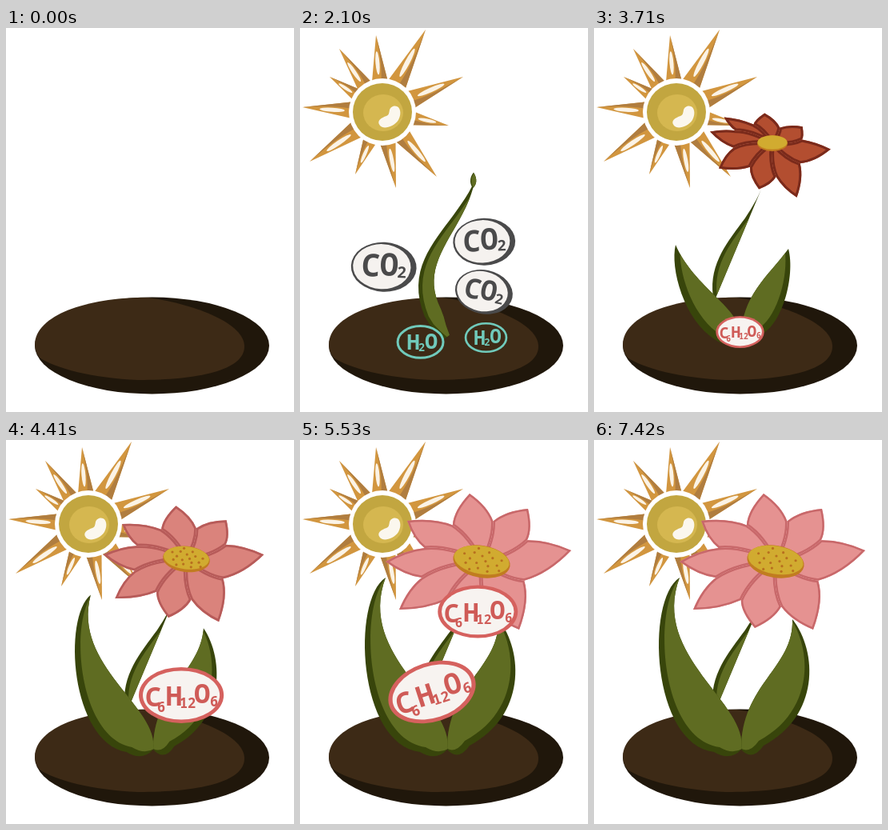
These frames come from a looping animation (360x480 px, 8680 ms). An HTML page with a canvas:

```html
<!DOCTYPE html>
<html lang="en">
<head>
<meta charset="utf-8">
<title>Photosynthesis</title>
<style>
html, body { margin: 0; width: 100%; height: 100%; overflow: hidden; background: #fff; }
canvas { display: block; }
</style>
</head>
<body>
<canvas id="stage" width="360" height="480"></canvas>
<script>
const ctx = document.getElementById('stage').getContext('2d');
const LOOP = 8680, BEAT = 70;
// Length of each pose in beats.
const POSES = [7, 7, 6, 5, 5, 5, 5, 4, 3, 6, 6, ...Array(8).fill(4), ...Array(5).fill(3), 18];
const FONT = '"Noto Sans Mono", "DejaVu Sans Mono", monospace';

const clamp = v => Math.max(0, Math.min(1, v));
const mix = (a, b, k) => a.map((v, i) => v + (b[i] - v) * k);
const rgb = c => `rgb(${c.map(Math.round)})`;

// Bezier curve through any number of control points.
function bezier(points, t) {
  while (points.length > 1) points = points.slice(1).map((p, i) => mix(points[i], p, t));
  return points[0];
}

function at(x, y, scale, degrees, draw) {
  ctx.save();
  ctx.translate(x, y);
  ctx.rotate(degrees * Math.PI / 180);
  ctx.scale(scale, scale);
  draw();
  ctx.restore();
}

function fill(path, color) {
  ctx.fillStyle = color;
  ctx.fill(path instanceof Path2D ? path : new Path2D(path));
}

function ellipse(x, y, rx, ry, angle = 0) {
  const p = new Path2D();
  p.ellipse(x, y, rx, ry, angle, 0, Math.PI * 2);
  return p;
}

// Dark green shape with its light copy shifted inside it.
function shade(d, dx, dy) {
  const p = new Path2D(d);
  ctx.save();
  fill(p, '#38450b');
  ctx.clip(p);
  ctx.translate(dx, dy);
  fill(p, '#5f6c22');
  ctx.restore();
}

function soil() {
  fill(ellipse(182.5, 397, 146.5, 60.5), '#20170b');
  fill('M36 396C36 358 105 336 178 337C240 346 298 370 298 398C298 428 240 440 165 440' +
    'C110 438 60 425 42 412Q36 404 36 396Z', '#3d2a16');
}

const RAYS = [[54, -103], [101, -44], [83, 17], [68, 81], [17, 95], [-34, 78],
  [-91, 62], [-100, -6], [-66, -44], [-54, -79], [-8, -96]];

function sun(n) {
  const moved = 2 * clamp((n - 2) / 2);
  ctx.globalAlpha = clamp(.45 + .15 * n);
  at(78 + 12.5 * moved, 86 + 9.5 * moved, Math.min(1, .29 + .178 * n), 0, () => {
    for (const [x, y] of RAYS) {
      const len = Math.hypot(x, y), w = len * .11 - 1, mid = 40 + (len - 40) * .38;
      at(0, 0, 1, Math.atan2(y, x) * 180 / Math.PI, () => {
        fill(`M40 ${-w}L${len} 0L40 ${w}Z`, '#d2963f');
        fill(`M40 ${w * .2}Q${mid} ${w * .5} ${len} 0L40 ${w}Z`, '#b07d3f');
        fill(ellipse(mid, -w * .1, (len - 40) * .26, w * .26), '#fbf3e6');
      });
    }
    fill(ellipse(0, 0, 42, 42), '#fff');
    fill(ellipse(0, 0, 37, 36), '#c2a640');
    fill(ellipse(1, 1, 25, 23), '#d5b750');
    fill('M13 -7C22 -10 25 1 20 10C14 19 1 22 -3 17C-8 11 -1 7 5 5C11 3 6 -4 13 -7Z', '#fbf7ee');
  });
  ctx.globalAlpha = 1;
}

// The stem grows along its spine and tapers towards the tip.
function stem(n) {
  const grown = Math.min(1, .17 + .277 * (n - 2));
  const spine = [[184, 386], [160 - 40 * grown, 300], [190, 265], [216, 198]];
  const start = n < 9 ? 0 : .2, least = n < 8 ? 1 : 5, left = [], right = [];
  for (let i = 0; i <= 24; i++) {
    const u = start + (grown - start) * i / 24, v = u / grown;
    const [x, y] = bezier(spine, u), [x2, y2] = bezier(spine, u + .01);
    const half = Math.max(least, 12 * Math.sqrt(grown) * (1 - v) ** .6) * Math.min(1, .3 + 7 * v);
    const k = half / Math.hypot(x2 - x, y2 - y);
    left.push([x + (y2 - y) * k, y - (x2 - x) * k]);
    right.unshift([x - (y2 - y) * k, y + (x2 - x) * k]);
  }
  shade('M' + [...left, ...right].map(p => p.join(' ')).join('L') + 'Z', 5 * Math.sqrt(grown), 0);
}

function bud(n) {
  at(216, 200, .25 + .75 * (n - 5), 0, () => shade('M4 -78C-20 -48 -14 -18 0 0C18 -14 26 -43 4 -78Z', 5, 0));
}

// Leaves, young and grown: tip, two outer controls, heel, two inner controls.
const LEFT = [[102, 271, 95, 300, 112, 365, 152, 390, 185, 350, 125, 325],
  [107, 172, 64, 200, 72, 380, 150, 390, 195, 330, 70, 270]];
const RIGHT = [[243, 276, 252, 310, 235, 375, 205, 385, 184, 335, 218, 310],
  [248, 224, 280, 265, 282, 345, 212, 382, 184, 305, 250, 285]];

function leaf([young, grown], k, dx) {
  const p = mix(young, grown, k);
  const tip = p.slice(0, 2), heel = p[6] < 184 ? 170 : 198;
  shade(`M${tip}C${p.slice(2, 8)}Q${heel} 402 184 387C${p.slice(8)} ${tip}Z`, dx, -6);
}

function leaves(size, k) {
  at(183, 388, size, 0, () => {
    ctx.translate(-183, -388);
    leaf(RIGHT, k, -6);
    leaf(LEFT, k, 7);
  });
}

// Petal tips of the open flower, clockwise from the top.
const TIPS = [[-15, -85], [58, -66], [112, -14], [47, 85], [-26, 83], [-103, 60], [-120, 0], [-93, -51]];

// Half a petal: from the notch between two petals, bulging, to the tip.
function bulge([nx, ny], [x, y]) {
  const along = (nx * x + ny * y) / (x * x + y * y);
  return [(nx + x) / 2 + (nx - along * x) * .35, (ny + y) / 2 + (ny - along * y) * .35];
}

// Control point that bends the seam between two petals.
const seam = ([x, y]) => [x * .58 - y * .14, y * .58 + x * .14];

function flower(size, open) {
  const cx = 223 + 4 * open, cy = 144 + 8 * open + 18 * (1 - size);
  const tone = Math.sqrt(open), tilt = .17 * open;
  const rx = 19 + 17 * open, ry = 10 + 10 * open;
  const tips = TIPS.map(([x, y]) => {
    const closed = y < 0 ? .42 : .73;
    return [x * (.65 + .35 * open), y * (closed + (1 - closed) * open) + x * .12 * (1 - open)];
  });
  const notches = tips.map((tip, i) => mix(tip, tips[(i + 1) % 8], .5).map(v => v * .67));
  at(cx, cy, size, 0, () => {
    ctx.lineJoin = 'round';
    ctx.lineWidth = 6 - open;
    ctx.strokeStyle = rgb(mix([122, 42, 27], [200, 104, 106], tone));
    tips.forEach((tip, i) => {
      const a = notches[(i + 7) % 8], b = notches[i];
      const petal = new Path2D(`M0 0Q${seam(a)} ${a}Q${bulge(a, tip)} ${tip}Q${bulge(b, tip)} ${b}Q${seam(b)} 0 0Z`);
      ctx.save();
      fill(petal, rgb(mix([179, 78, 48], [229, 146, 145], tone)));
      ctx.clip(petal);
      ctx.stroke(petal);
      ctx.restore();
    });
    fill(ellipse(0, 0, rx, ry, tilt), '#c17c20');
    fill(ellipse(0, -ry * .1, rx * .97, ry * .88, tilt), '#d1ab30');
    if (open < .5) return;
    for (let i = 0; i < 17; i++) {
      const a = i * 2.4, r = Math.sqrt((i + .5) / 17) * .8;
      fill(ellipse(Math.cos(a) * r * rx, Math.sin(a) * r * ry + Math.cos(a) * r * 4 - 1, 1.6, 1.6), '#b8701f');
    }
  });
}

// Letters at x and baseline; digits are set at half size.
function formula(color, size, ...letters) {
  ctx.fillStyle = color;
  ctx.textAlign = 'center';
  for (const [char, x, y] of letters) {
    ctx.font = `600 ${/\d/.test(char) ? size / 2 : size}px ${FONT}`;
    ctx.fillText(char, x, y);
  }
}

function carbon() {
  fill(ellipse(0, 0, 43, 32.5), '#4a4a4b');
  fill(ellipse(-2.5, -.5, 38, 29.5), '#f5f2ef');
  formula('#4a4a4b', 41, ['C', -17, 13], ['O', 7, 11], ['2', 24, 13]);
}

function water() {
  ctx.lineWidth = 4;
  ctx.strokeStyle = '#70cabb';
  ctx.stroke(ellipse(0, 0, 38, 26.5));
  formula('#70cabb', 36, ['H', -12, 13], ['2', 2, 15], ['O', 18, 11]);
}

function glucose() {
  fill(ellipse(0, 0, 53, 35), '#d5615e');
  fill(ellipse(0, 0, 48, 30.5), '#f7f3f0');
  formula('#cf5b57', 34, ['C', -35, 14], ['6', -25, 21], ['H', -9, 13], ['12', 8, 16], ['O', 26, 10], ['6', 41, 14]);
}

// Labels: first and last pose, then a curve of x, y, size and angle.
const GLIDES = [
  [carbon, 1, 8, [58, 200, .97, 0], [72, 285, 1.18, 0], [180, 375, .6, 8]],
  [carbon, 1, 7, [297, 289, 1, 10], [268, 310, 1.05, 10], [175, 360, .6, 14]],
  [carbon, 4, 7, [250, 248, .9, 0], [218, 272, 1, -4], [200, 325, .55, 0]],
  [water, 1, 7, [107, 392, 1.02, 0], [140, 392, .98, 0], [172, 393, .45, 0]],
  [water, 3, 7, [262, 404, .88, 0], [234, 380, .65, 0], [200, 384, .5, 0]],
  [glucose, 10, 19, [182.5, 380, .57, 0], [267, 285, 1.52, 0], [200, 204, 1, 0], [227, 157, .47, 0]],
  [glucose, 13, 16, [178, 377, .55, -5], [160, 335, 1.1, -12], [165, 315, 1.06, -18]],
  [glucose, 17, 23, [140, 280, 1.06, -18], [110, 240, 1.1, -18], [260, 173, 1.1, 0], [225, 153, .44, 0]]
];

function render(n) {
  const size = Math.min(1, .42 + .25 * (n - 7));
  const open = clamp((n - 10) / 3) ** 1.2;
  ctx.fillStyle = '#fff';
  ctx.fillRect(0, 0, 360, 480);
  soil();
  if (n > 0) sun(n);
  if (n > 1) stem(n);
  if (n === 5 || n === 6) bud(n);
  if (n > 6) {
    leaves(size, Math.sqrt(open));
    flower(size, open);
  }
  for (const [draw, first, last, ...curve] of GLIDES) {
    if (n >= first && n <= last) at(...bezier(curve, (n - first) / (last - first)), draw);
  }
}

function poseAt(time) {
  let n = 0;
  for (let end = POSES[0] * BEAT; time >= end; end += POSES[n] * BEAT) n++;
  return n;
}

let shown = -1;
function tick() {
  const n = poseAt(performance.now() % LOOP);
  if (n !== shown) render(shown = n);
  requestAnimationFrame(tick);
}
tick();
</script>
</body>
</html>
```
